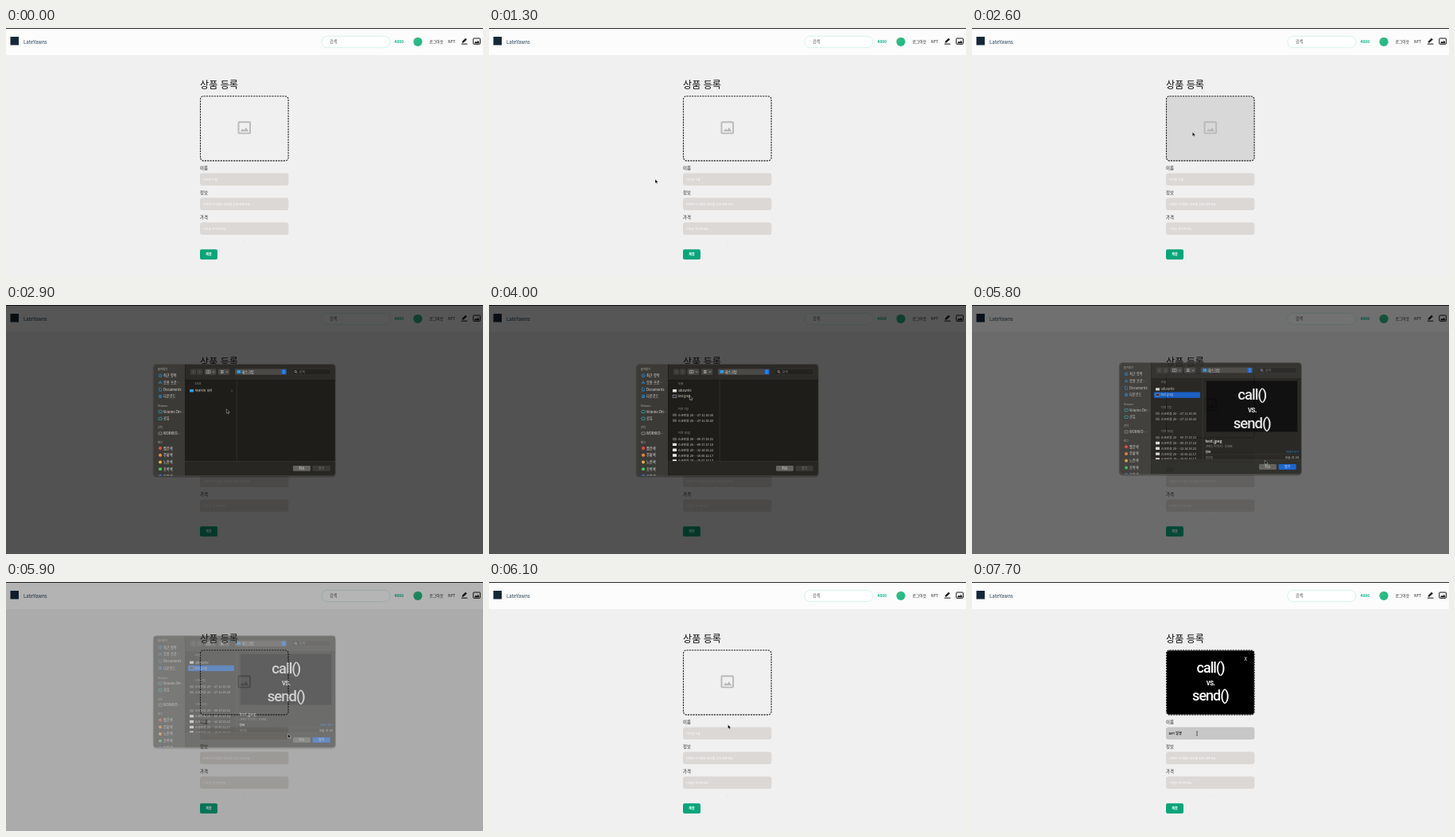
An HTML page for the animation above (8000 ms loop, 600 px wide and 313 px high).

```html
<!DOCTYPE html>
<html lang="ko">
<head>
<meta charset="utf-8">
<title>상품 등록</title>
<style>
html, body { margin: 0; width: 100%; height: 100%; overflow: hidden; background: #f0f0f0; }
svg { display: block; width: 100vw; height: 100vh; }
text { font-family: "Noto Sans CJK KR", "Noto Sans CJK JP", "Noto Sans CJK", "Noto Sans", sans-serif; white-space: pre; }
.art text { font-family: Roboto, sans-serif; font-weight: 500; }
</style>
</head>
<body>
<svg id="stage" viewBox="0 0 600 313" preserveAspectRatio="none" xmlns="http://www.w3.org/2000/svg"></svg>
<script>
const LOOP = 8000, STEP = 100;

const rect = (x, y, w, h, fill, r = 0, more = '') =>
  `<rect x="${x}" y="${y}" width="${w}" height="${h}" rx="${r}" fill="${fill}" ${more}/>`;
const text = (x, y, size, fill, str, more = '') =>
  `<text x="${x}" y="${y}" font-size="${size}" fill="${fill}" ${more}>${str}</text>`;
const line = (d, stroke, width = 0.6, more = '') =>
  `<path d="${d}" fill="none" stroke="${stroke}" stroke-width="${width}" ${more}/>`;
const shape = (d, fill, more = '') => `<path d="${d}" fill="${fill}" ${more}/>`;
const dot = (x, y, r, fill) => `<circle cx="${x}" cy="${y}" r="${r}" fill="${fill}"/>`;
const group = (id, body, more = '') => `<g id="${id}" ${more}>${body}</g>`;
const BOLD = 'font-weight="700"', MEDIUM = 'font-weight="500"';
const END = 'text-anchor="end"', MID = 'text-anchor="middle"';

function header() {
  return rect(0, 0, 600, 34, '#fcfcfc') + rect(0, 0, 600, 1, '#2a2a2a') +
    rect(5.5, 11, 10.5, 10.5, '#14283a') +
    text(22, 19.6, 6.1, '#1d3c50', 'LateYawns', MEDIUM) +
    rect(397, 10.3, 86, 14.4, '#fff', 7.2, 'stroke="#c4eee5" stroke-width=".7"') +
    text(407, 19, 5.2, '#555', '검색') +
    text(488.6, 19, 4.9, '#08b78c', '4000', BOLD) +
    dot(518, 17.3, 5.6, 'url(#face)') +
    text(532.5, 19, 4.8, '#222', '로그아웃', MEDIUM) +
    text(556, 19, 4.9, '#222', 'NFT', MEDIUM) +
    shape('M573.7 18.6V17L578 12.7 579.8 14.4 575.4 18.6Z', '#111') +
    rect(572.8, 19.6, 7.6, 1, '#111') +
    rect(587.8, 13, 8.6, 7.3, 'none', 0.8, 'stroke="#111" stroke-width="1"') +
    shape('M589 19.2L591 16.6 592.3 17.9 593.8 15.6 595.6 19.2Z', '#111');
}

function form() {
  const fields = [
    ['이름', '아이템 이름'],
    ['정보', '선택한 아이템의 정보를 입력 해주세요'],
    ['가격', '가격을 적어주세요']
  ];
  const rows = fields.map(([label, hint], i) => {
    const y = 182.6 + i * 31;
    return text(244, y - 4.3, 5.4, '#222', label, MEDIUM) +
      rect(244, y, 111.4, 15.5, '#dcd8d5', 3, `id="box${i}"`) +
      text(247.6, y + 9.2, 3.75, '#fff', hint, `id="hint${i}"`);
  }).join('');
  return text(244, 75.8, 12.1, '#0c0c0c', '상품 등록', MEDIUM) +
    rect(244.5, 85.7, 110.6, 81.2, '#f0f0f0', 4, 'id="drop"') +
    group('blank',
      rect(292.5, 118.2, 14.6, 14.2, 'none', 1, 'stroke="#b9b9b9" stroke-width="1.9"') +
      shape('M294.8 130L297.6 126.6 299.4 128.6 302 125 305.2 130Z', '#b9b9b9')) +
    group('photo', rect(245, 86.2, 109.8, 80.4, '#000', 3) + art(300, 1) +
      text(344.3, 98.6, 6.3, '#fff', 'X', MID)) +
    rect(244.5, 85.7, 110.6, 81.2, 'none', 4,
      'id="dash" stroke="#222" stroke-width="1.1" stroke-dasharray="2.2 1.1"') +
    rows +
    text(247.4, 191.9, 4, '#222', 'NFT 발행', BOLD + ' id="typed"') +
    rect(247.2, 188, 0.7, 5.2, '#111', 0, 'id="caret"') +
    dot(300, 269, 0.5, '#cfcfcf') +
    rect(244, 278.2, 22, 12.8, '#0aa57a', 2) +
    text(255, 286.2, 4.1, '#fff', '제출', BOLD + ' ' + MID);
}

// The lettering of the chosen picture, centred on x = 300.
function art(x, k, y = 0) {
  const put = (base, size, str, gap) =>
    text(0, base, size, '#fff', str, `${MID} letter-spacing="${gap}"`);
  return `<g class="art" transform="translate(${x} ${y}) scale(${k})">` +
    put(114.3, 18, 'call()', -1) + put(129.6, 10, 'vs.', -0.8) +
    put(148.8, 18, 'send()', -1) + '</g>';
}

function popup() {
  const items = ['NFT 발행', 'NFT 등록', 'NFT', '발행', '아이템'];
  return rect(243.6, 199.6, 112, 72, '#2b2c2f', 1.5, 'stroke="#55565a" stroke-width=".5"') +
    items.map((s, i) => text(248, 208.6 + i * 13.7, 4.4, '#e8e8ea', s)).join('');
}

function sidebar() {
  const gray = '#8d8b86', ink = '#e4e2de', blue = '#2497ef';
  const head = (y, s) => text(190.7, y, 3.4, gray, s, BOLD);
  const item = (y, s, mark) => mark(y - 1.5) + text(198, y, 4.2, ink, s, MEDIUM);
  const ring = y => `<circle cx="194" cy="${y}" r="1.9" fill="none" stroke="${blue}" stroke-width=".7"/>` +
    line(`M194 ${y - 1.1}V${y}H195`, blue, 0.5);
  const tri = y => line(`M192.2 ${y + 1.7}L194 ${y - 1.9} 195.8 ${y + 1.7}M191.8 ${y + 0.6}H196.2`, blue);
  const page = y => line(`M192.5 ${y - 2}H194.5L195.6 ${y - 0.9}V${y + 2}H192.5Z`, blue);
  const down = y => ring(y) + line(`M194 ${y - 1}V${y + 1}M193.2 ${y + 0.3}L194 ${y + 1.1} 194.8 ${y + 0.3}`, blue, 0.5);
  const box = color => y => rect(191.9, y - 1.5, 4.4, 3.2, 'none', 1, `stroke="${color}" stroke-width=".7"`);
  const tag = color => y => dot(194, y, 2, color);
  const tags = [['빨간색', '#f0483e'], ['주황색', '#f08a3a'], ['노란색', '#e8ad3c'],
    ['초록색', '#45c759'], ['파란색', '#3478f0']];
  return head(82.2, '즐겨찾기') +
    item(90.3, '최근 항목', ring) + item(98.9, '응용 프로…', tri) +
    item(107.6, 'Documents', page) + item(116.3, '다운로드', down) +
    head(128.3, 'Velumo') +
    item(135.5, 'Velumo Dri…', box('#35b3c8')) + item(144.2, '공유', box('#35b3c8')) +
    head(155.4, '위치') + item(162.8, 'WORKVO…', box('#a5a39e')) +
    head(174.2, '태그') +
    tags.map(([s, c], i) => item(181.6 + i * 8.75, s, tag(c))).join('');
}

function toolbar() {
  const btn = '#3d3c38', ink = '#bdbbb6';
  return rect(225, 74.3, 189, 20, '#2b2a27') +
    rect(232, 80.3, 7.2, 7.4, btn, 1.2) + rect(240, 80.3, 7.2, 7.4, btn, 1.2) +
    line('M236.3 82.5L234.9 84 236.3 85.5M242.9 82.5L244.3 84 242.9 85.5', '#77756f') +
    rect(249.7, 80.3, 14.6, 7.4, '#474642', 1.2) + rect(267, 80.3, 14.2, 7.4, '#474642', 1.2) +
    line('M252.3 82.3H257V85.7H252.3ZM254.6 82.3V85.7M260 83.5L261.2 84.7 262.4 83.5', ink) +
    line('M270 82.6H273.6M270 84H273.6M270 85.4H273.6M276.8 83.5L278 84.7 279.2 83.5', ink, 0.8) +
    rect(288, 80.3, 65, 7.4, '#4a4945', 1.2) +
    rect(290.5, 82, 4.6, 3.8, '#2b9df0', 0.6) +
    text(296.5, 85.6, 4.2, '#eceae6', '데스크탑', MEDIUM) +
    rect(346.5, 80.9, 5.8, 6.2, '#0d68e0', 1.2) +
    line('M348.3 83.4L349.4 82.2 350.5 83.4M348.3 84.6L349.4 85.8 350.5 84.6', '#fff', 0.5) +
    rect(359.8, 80.3, 48.5, 7.4, '#23221f', 1.4, 'stroke="#45443f" stroke-width=".4"') +
    `<circle cx="364.2" cy="83.7" r="1.3" fill="none" stroke="${ink}" stroke-width=".6"/>` +
    line('M365.1 84.7L366.3 85.9', ink) + text(368.6, 85.5, 4, '#7d7b76', '검색');
}

function files() {
  const gray = '#98968f', ink = '#dedcd7';
  const head = (y, s) => text(237.6, y, 3.7, gray, s, MEDIUM);
  const row = (y, s, icon) => rect(231, y - 3.2, 5, 3.4, icon, 0.5) + text(237.6, y, 3.8, ink, s, MEDIUM);
  const shot = (y, s, icon) => row(y, '스크린샷 20…-' + s, icon);
  const shots = ['09 17.15.31', '09 17.17.18', '12 14.53.22', '15 00.12.17', '15 02.10.17'];
  const early = head(99.8, '2021') + row(109.3, '재배치된 항목', '#2b9df0') +
    line('M283.4 106.6L284.6 107.9 283.4 109.2', gray, 0.5);
  const full = head(99.8, '오늘') + row(109.3, 'lab2Write', '#e6e4df') +
    rect(228.8, 111.4, 58.2, 7.2, '#0b5fd8', 1.2, 'id="pick"') + row(116.3, 'test.jpeg', '#2c3038') +
    rect(231, 113.1, 5, 3.4, 'none', 0.5, 'stroke="#e6e4df" stroke-width=".4"') +
    head(132.1, '이전 7일') + shot(139.8, '27 11.30.30', '#55544f') + shot(146.8, '27 11.30.43', '#55544f') +
    head(162.1, '이전 30일') +
    shots.map((s, i) => shot(170 + i * 6.85, s, i ? '#f0eeea' : '#55544f')).join('');
  return group('early', early) + group('full', full);
}

function preview() {
  return rect(294.8, 97.2, 114.4, 64, '#000') + art(352.3, 1.03, 3.6) +
    text(293.4, 174.8, 4.9, '#eceae6', 'test.jpeg', BOLD) +
    text(293.4, 181, 3.9, '#98968f', 'JPEG 이미지 - 83KB') +
    text(293.4, 188, 3.8, '#eceae6', '정보', BOLD) +
    text(411, 188, 3.3, '#2b83f0', '자세히 보기', END) +
    line('M293.4 189.8H411', '#3b3a36', 0.4) +
    text(293.4, 195, 3.6, '#98968f', '생성일') +
    text(411, 195, 3.7, '#eceae6', '오늘 21:24', END + ' ' + MEDIUM);
}

function dialog() {
  return rect(184.8, 74.6, 230, 142, '#000', 5, 'opacity=".25"') +
    '<g clip-path="url(#sheet)">' +
    rect(185.5, 74.3, 229, 140.4, '#1e1d19') + rect(185.5, 74.3, 39.8, 140.4, '#3b3a36') +
    sidebar() + toolbar() +
    rect(225.3, 94.2, 189, 0.4, '#11110f') + rect(225, 74.3, 0.5, 140.4, '#151512') +
    '<g clip-path="url(#body)">' + files() + group('preview', preview()) + '</g>' +
    rect(289.8, 94.4, 0.6, 101.6, '#3b3a36') +
    rect(225.3, 196, 189, 19, '#272622') + rect(225.3, 196, 189, 0.4, '#3b3a36') +
    rect(361, 202, 22, 6.8, '#64635e', 1.3) + text(372, 207, 4, '#f0eeea', '취소', MID + ' ' + MEDIUM) +
    rect(385.6, 202, 22.2, 6.8, '#3a3935', 1.3, 'id="ok"') +
    text(396.7, 207, 4, '#fff', '열기', MID + ' ' + MEDIUM + ' id="okText"') + '</g>' +
    rect(185.7, 74.5, 228.6, 140, 'none', 4, 'stroke="#5c5b57" stroke-width=".4"');
}

document.getElementById('stage').innerHTML =
  '<defs><linearGradient id="face" x1="0" y1="0" x2="1" y2="1">' +
  '<stop offset="0" stop-color="#6fb36a"/><stop offset=".45" stop-color="#1fbd8c"/>' +
  '<stop offset="1" stop-color="#3fae78"/></linearGradient>' +
  `<clipPath id="sheet">${rect(185.5, 74.3, 229, 140.4, '#000', 4)}</clipPath>` +
  `<clipPath id="body">${rect(225, 94, 190, 102, '#000')}</clipPath></defs>` +
  rect(0, 0, 600, 313, '#f0f0f0') + header() + form() + group('popup', popup()) +
  rect(0, 0, 600, 313, '#000', 0, 'id="shade"') + group('dialog', dialog()) +
  group('arrow', shape('M0 0V5.3L1.3 4.2 2.1 6 3 5.6 2.2 3.9H3.9Z', '#000',
    'stroke="#fff" stroke-width=".4"')) +
  group('beam', line('M-1 -2.6Q0 -2.6 0 -2Q0 -2.6 1 -2.6M0 -2V2M-1 2.6Q0 2.6 0 2Q0 2.6 1 2.6', '#222', 0.6));

const el = {};
document.querySelectorAll('[id]').forEach(n => el[n.id] = n);
const show = (id, on) => el[id].setAttribute('visibility', on ? 'inherit' : 'hidden');
const set = (id, name, v) => el[id].setAttribute(name, v);
const clamp = v => Math.max(0, Math.min(1, v));

// Pointer stops: time, x, y
const route = [
  [700, 60, 299], [900, 118, 240], [1100, 118, 240], [1500, 300, 140], [1700, 300, 140],
  [2000, 276.5, 130], [2500, 276.5, 130], [2600, 277.3, 130.8], [2900, 277.3, 130.8],
  [3600, 262, 118], [4100, 250, 113], [4500, 250, 113], [5000, 385.5, 228.4],
  [5400, 396, 204], [5600, 396, 204], [5900, 354.5, 191], [6100, 300.5, 179.3], [6300, 283, 190.5]
];
function pointer(t) {
  const i = route.findIndex(p => p[0] > t);
  if (i < 1) return route[i < 0 ? route.length - 1 : 0].slice(1);
  const [a, b] = [route[i - 1], route[i]];
  const k = (t - a[0]) / (b[0] - a[0]);
  return [a[1] + (b[1] - a[1]) * k, a[2] + (b[2] - a[2]) * k];
}

function draw(time) {
  const t = Math.floor(time % LOOP / STEP) * STEP;
  const [x, y] = pointer(t);
  const typing = t >= 6300;
  set('arrow', 'transform', `translate(${x} ${y})`);
  set('beam', 'transform', `translate(${x} ${y})`);
  show('arrow', t >= 700 && !typing);
  show('beam', typing);

  const over = t >= 1100 && t < 2800 && x > 244 && x < 355 && y > 86 && y < 167;
  set('drop', 'fill', over ? '#d8d8d8' : '#f0f0f0');
  show('photo', t >= 6200);
  show('blank', t < 6200);

  // The sheet and its shade come and go together.
  const p = t < 4000 ? clamp((t - 2700) / 200) : clamp((6010 - t) / 250);
  set('shade', 'opacity', 0.66 * p);
  set('dialog', 'opacity', p);
  set('dialog', 'transform', `translate(0 ${-12 * (1 - p)})`);
  show('dialog', p > 0);
  const listed = t >= 3200, picked = t >= 4200;
  show('early', !listed);
  show('full', listed);
  show('pick', picked);
  show('preview', picked);
  set('ok', 'fill', picked ? '#0c66e4' : '#3a3935');
  set('okText', 'fill', picked ? '#fff' : '#7a7872');

  set('box0', 'fill', t >= 6400 ? '#c7c7c7' : typing ? '#d0cecd' : '#dcd8d5');
  const filled = t >= 7700;
  show('typed', filled);
  show('hint0', !filled);
  show('caret', t >= 6700 && t < 7200);
  show('popup', t >= 6700 && !filled);
  set('popup', 'opacity', t < 6800 ? 0.5 : 1);
}

const start = performance.now();
function tick() {
  draw(performance.now() - start);
  requestAnimationFrame(tick);
}
draw(0);
requestAnimationFrame(tick);
</script>
</body>
</html>
```
